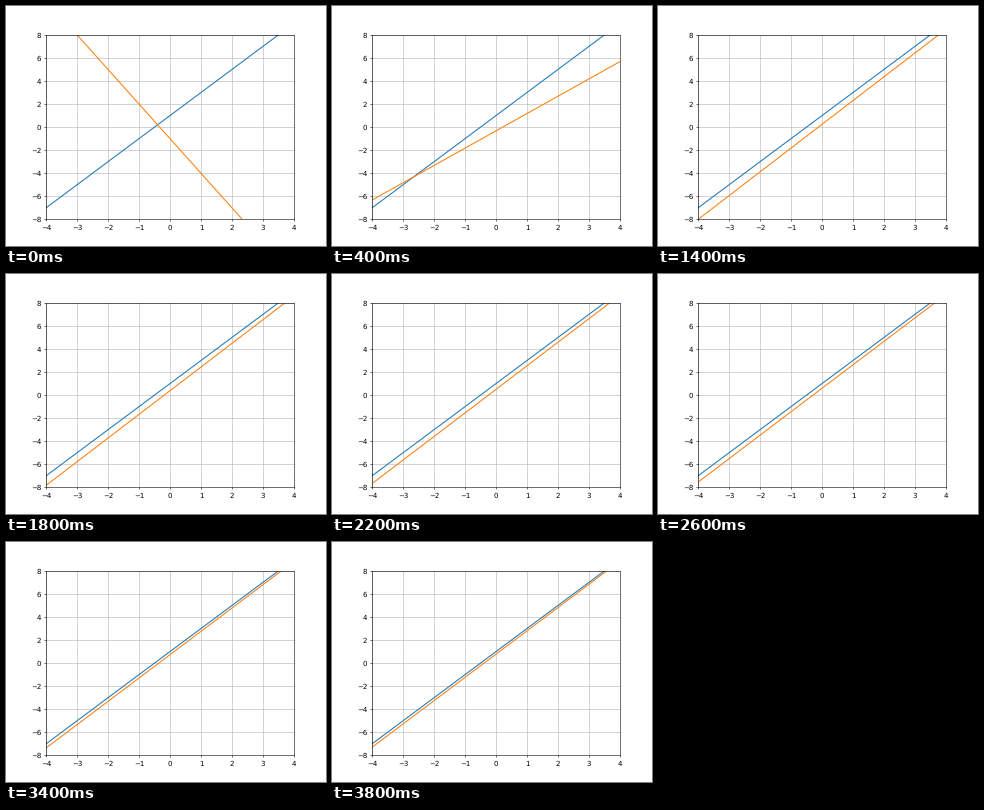
A matplotlib script that plays this animation: 320x240 px, repeating every 4 s.

```python
import numpy as np
import matplotlib.pyplot as plt
from matplotlib.animation import FuncAnimation

plt.rcParams["text.hinting"] = "none"

FRAMES, INTERVAL = 20, 200
TARGET = np.array([2.0, 1.0])   # slope, intercept
START = np.array([-3.0, -1.0])

# Gradient descent on a quadratic loss: the error shrinks along two
# orthogonal directions, one quickly and one slowly.
TILT = 0.085
AXES = np.array([[1, TILT], [-TILT, 1]]) / np.hypot(1, TILT)
DECAY = np.array([0.344, 0.902])

x = np.array([-4.0, 4.0])


def fit(step):
    error = AXES @ (START - TARGET)
    return TARGET + (error * DECAY**step) @ AXES


fig, ax = plt.subplots(figsize=(6.4, 4.8), dpi=50)
fig.subplots_adjust(bottom=0.1107)
ax.set(xlim=(-4, 4), ylim=(-8, 8))
ax.set_xticks(range(-4, 5))
ax.set_yticks(range(-8, 9, 2))
ax.tick_params(axis="x", pad=4)
ax.grid(True)
ax.plot(x, np.polyval(TARGET, x))
guess, = ax.plot(x, np.polyval(START, x))


def update(step):
    guess.set_ydata(np.polyval(fit(step), x))
    return guess,


anim = FuncAnimation(fig, update, frames=FRAMES, interval=INTERVAL,
                     repeat=True, repeat_delay=0)
plt.show()
```
